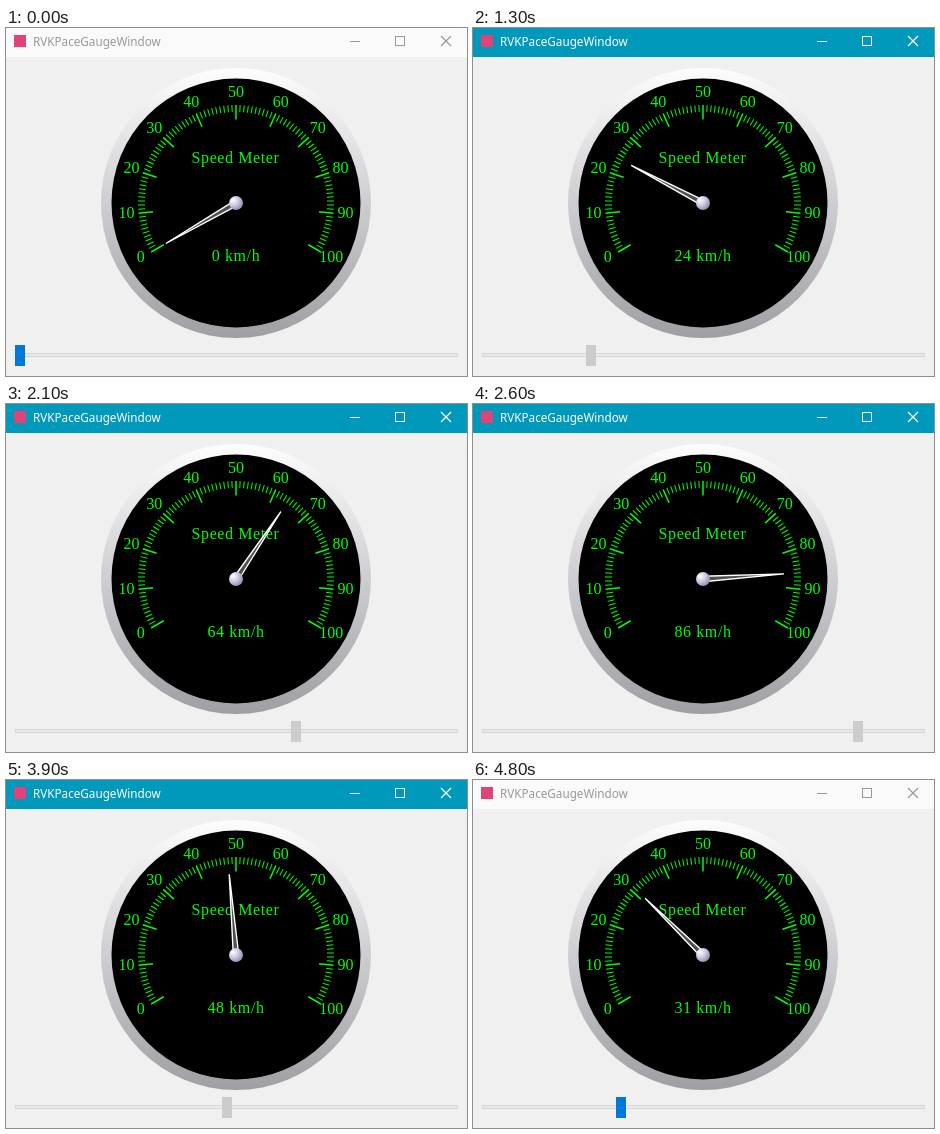
These frames come from a looping animation (461x348 px, 4900 ms). An HTML page with a canvas:

```html
<!DOCTYPE html>
<html lang="en">
<head>
<meta charset="utf-8">
<title>Speed Meter</title>
<style>
  html, body { margin: 0; width: 100%; height: 100%; overflow: hidden; background: #f0f0f0; }
  canvas { display: block; }
</style>
</head>
<body>
<canvas id="stage" width="461" height="348"></canvas>
<script>
const ctx = document.getElementById('stage').getContext('2d');
const LOOP = 4900, STEP = 100, CX = 230, CY = 175, GREEN = '#00ff00';

// Dragged value over time: [ms, km/h]
const drag = [
  [800, 0], [1300, 24], [1900, 51], [2100, 64], [2500, 82], [2900, 97],
  [3000, 98], [3100, 97], [3200, 88], [3700, 59], [3900, 48], [4300, 31]
];

function valueAt(t) {
  if (t <= drag[0][0]) return 0;
  const i = drag.findIndex(([time]) => time >= t);
  if (i < 0) return drag[drag.length - 1][1];
  const [t0, v0] = drag[i - 1], [t1, v1] = drag[i];
  return Math.round(v0 + (v1 - v0) * (t - t0) / (t1 - t0));
}

const angleOf = value => (value - 50) * 2.4 * Math.PI / 180;

function rect(x, y, w, h, color) {
  ctx.fillStyle = color;
  ctx.fillRect(x, y, w, h);
}

function disc(x, y, r, fill) {
  ctx.fillStyle = fill;
  ctx.beginPath();
  ctx.arc(x, y, r, 0, Math.PI * 2);
  ctx.fill();
}

function line(x0, y0, x1, y1) {
  ctx.beginPath();
  ctx.moveTo(x0, y0);
  ctx.lineTo(x1, y1);
  ctx.stroke();
}

function gradient(g, ...colors) {
  colors.forEach((c, i) => g.addColorStop(i / (colors.length - 1), c));
  return g;
}

function dialText(text, x, y, spacing = 0) {
  ctx.font = '16px "Liberation Serif", serif';
  ctx.letterSpacing = `${spacing}px`;
  ctx.textAlign = 'center';
  ctx.fillStyle = GREEN;
  ctx.fillText(text, x, y + 5.5);
  ctx.letterSpacing = '0px';
}

function rotated(value, draw) {
  ctx.save();
  ctx.translate(CX, CY);
  ctx.rotate(angleOf(value));
  draw();
  ctx.restore();
}

function titleBar(active) {
  rect(0, 0, 461, 29, active ? '#0099bc' : '#fafafa');
  rect(8, 7, 12, 12, '#e0437a');
  ctx.font = '11.7px "Noto Sans", "Open Sans", sans-serif';
  ctx.textAlign = 'left';
  ctx.fillStyle = ctx.strokeStyle = active ? '#fff' : '#999';
  ctx.fillText('RVKPaceGaugeWindow', 27, 18);
  ctx.lineWidth = 1;
  line(344, 13.5, 354, 13.5);
  ctx.strokeRect(389.5, 8.5, 9, 9);
  ctx.lineWidth = 1.3;
  line(435, 8, 445, 18);
  line(445, 8, 435, 18);
}

function dial(value) {
  disc(CX, CY, 135, gradient(ctx.createLinearGradient(0, 40, 0, 310), '#fdfdfd', '#cecdd1', '#9f9ea3'));
  disc(CX, CY, 124.5, '#000');

  ctx.strokeStyle = GREEN;
  for (let v = 0; v <= 100; v++) {
    const major = v % 10 === 0;
    ctx.lineWidth = major ? 1.5 : 1;
    rotated(v, () => line(0, -98, 0, major ? -83.5 : -91));
    if (major) {
      const a = angleOf(v);
      dialText(v, CX + 110 * Math.sin(a), CY - 1.5 - 110 * Math.cos(a));
    }
  }
  dialText('Speed Meter', CX - 0.5, 129, 0.6);
  dialText(`${value} km/h`, CX, 227, 0.6);

  rotated(value, () => {
    ctx.beginPath();
    ctx.moveTo(-2.7, 0);
    ctx.lineTo(0, -81);
    ctx.lineTo(2.7, 0);
    ctx.closePath();
    ctx.fillStyle = '#505050';
    ctx.fill();
    ctx.strokeStyle = '#fff';
    ctx.lineWidth = 1.4;
    ctx.lineJoin = 'bevel';
    ctx.stroke();
  });
  disc(CX, CY, 7, gradient(ctx.createRadialGradient(227, 172, 0, 228, 173, 10), '#fff', '#cfc9e0', '#8e86ac'));
}

function slider(value, color) {
  rect(9, 325, 443, 4, '#d6d6d6');
  rect(10, 326, 441, 2, '#e7eaea');
  rect(Math.round(9 + value * 4.318), 317, 10, 21, color);
}

function handleColor(t) {
  if (t < 500 || t >= 4400) return '#0078d7';
  return t < 800 ? '#171717' : '#cccccc';
}

function render(now) {
  const t = Math.floor(now % LOOP / STEP) * STEP;
  const value = valueAt(t);
  rect(0, 0, 461, 348, '#f0f0f0');
  titleBar(t >= 800 && t < 4800);
  dial(value);
  slider(value, handleColor(t));
}

const start = performance.now();
function tick() {
  render(performance.now() - start);
  requestAnimationFrame(tick);
}
tick();
</script>
</body>
</html>
```
